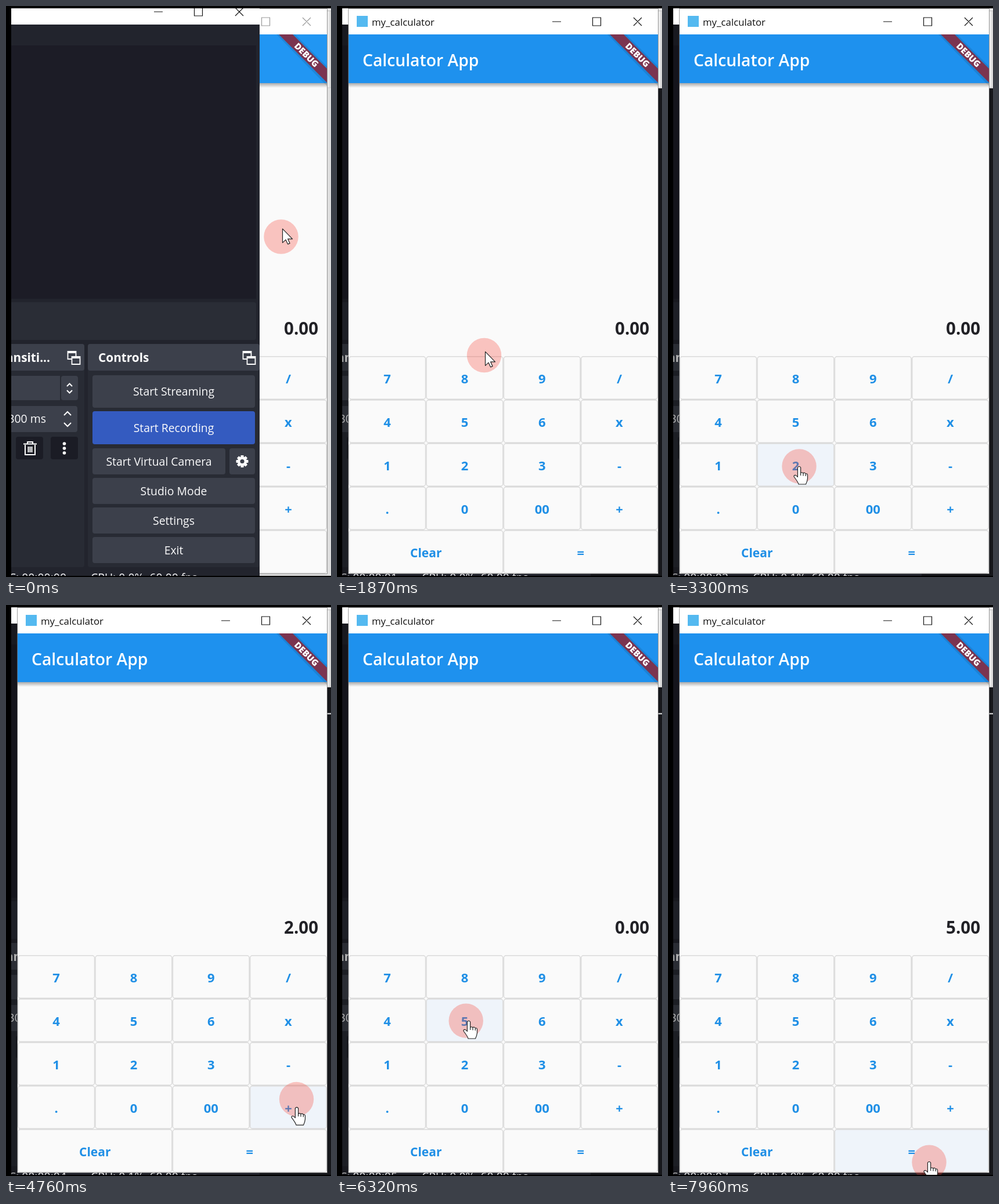
Recreate the animation shown at these times as an HTML page. Size 560x985 px, loop 8 s.

```html
<!DOCTYPE html>
<html lang="en">
<head>
<meta charset="utf-8">
<title>Calculator demo</title>
<style>
  html, body { margin: 0; width: 100%; height: 100%; overflow: hidden; background: #000; }
  svg { display: block; width: 560px; height: 985px; font-family: "Open Sans", "Noto Sans", sans-serif; }
  .ui { font-size: 19.4px; fill: #fbfbfc; }
  .dock { font-size: 20.8px; font-weight: 700; fill: #fff; }
  .key { font-size: 22px; font-weight: 700; fill: #1f8fe6; text-anchor: middle; }
  .mid { text-anchor: middle; }
  .end { text-anchor: end; }
  .line { fill: none; stroke: #fff; stroke-width: 2; }
</style>
</head>
<body>
<svg id="stage" viewBox="0 0 560 985">
  <defs>
    <clipPath id="screen"><rect x="9" y="4" width="551" height="979"/></clipPath>
    <clipPath id="panel"><rect x="9" y="4" width="428" height="979"/></clipPath>
    <clipPath id="app"><rect x="20" y="4" width="533" height="975"/></clipPath>
    <linearGradient id="shade" x2="0" y2="1">
      <stop offset="0" stop-opacity=".32"/><stop offset="1" stop-opacity="0"/>
    </linearGradient>
  </defs>
  <rect width="560" height="985"/>
  <g clip-path="url(#screen)">
    <rect id="desk" x="9" y="4" width="551" height="979"/>
    <path d="M553 4h7v138h-7z" fill="#e9e9e9"/>
    <path d="M553 8.5h7M553 141h7M558.5 9v132" stroke="#c4c4c4" fill="none"/>
    <path id="mark" d="M553 187.5h7" stroke="#e8e8e8" stroke-width="2"/>
    <g id="studio" clip-path="url(#panel)"></g>
    <path id="dim" d="M9 32h11v951H9z" fill-opacity=".3"/>
    <g id="calc" clip-path="url(#app)"></g>
    <path id="frame" d="M19.5 4.5h534v975h-534z" fill="none" stroke="#777" stroke-opacity=".7"/>
    <use id="front" href="#studio"/>
    <circle id="halo" r="29.7" fill="#f44336" fill-opacity=".3"/>
    <g id="pointer" fill="#fff" stroke="#222" stroke-width="1.2" stroke-linejoin="round">
      <path id="arrow" d="M.5.5V24.5L6 19.3 9.6 27 13 25.5 9.6 18H17.5Z"/>
      <path id="hand" d="M-2.6 2Q0-1.5 2.6 2V12Q4.6 9.5 7 12 9.5 10 11.3 13 14 12 14.5 15V21Q14 26 11.5 31H-1Q-2 27-8.6 18.5-10 15.5-6.6 15.3-4.6 16-2.6 18.5ZM2.6 12V16M7 12V16.5M11.3 13V17"/>
    </g>
  </g>
</svg>
<script>
const LOOP = 8000, RAISE = 210, SWAP = 900, MARK = 3650;
const $ = id => document.getElementById(id);
const rect = (x, y, x2, y2, fill, r = 0) =>
  `<rect x="${x}" y="${y}" width="${x2 - x}" height="${y2 - y}" rx="${r}" fill="${fill}"/>`;
const text = (x, y, str, cls, extra = '') => `<text x="${x}" y="${y}" class="${cls}" ${extra}>${str}</text>`;
const path = (d, cls, extra = '') => `<path d="${d}" class="${cls}" ${extra}/>`;
const winButtons = (x, y) =>
  `M${x} ${y}h15M${x + 69.5} ${y - 7}h14v14h-14zM${x + 140} ${y - 7}l14 14m0-14l-14 14`;

// Recording studio window
const GREY = '#3c404b', DARK = '#1b1c25';
const popIcon = x => `<g fill="${GREY}" stroke="#fff" stroke-width="1.8">
  <path d="M${x} 596h14v13h-14z"/><path d="M${x + 7} 605h14v13h-14z"/></g>` +
  path(`M${x} 598h14M${x + 7} 607h14`, 'line', 'stroke-width="3"');
const bar = (y, y2, label, x2 = 429, fill = GREY) =>
  rect(149, y, x2, y2, fill, 4) + text((149 + x2) / 2, (y + y2) / 2 + 7, label, 'ui mid');
const teeth = [0, 45, 90, 135].map(a =>
  `<rect x="-2.6" y="-10.5" width="5.2" height="21" rx="1" transform="rotate(${a})"/>`).join('');

$('studio').innerHTML = [
  rect(9, 4, 437, 983, '#22242d'),
  rect(9, 4, 437, 32, '#fff'),
  path(winButtons(255, 10), '', 'fill="none" stroke="#111" stroke-width="1.2"'),
  rect(9, 68, 431, 505, '#1c1c26'),
  rect(0, 511, 431, 576, '#2a2d36', 4),
  rect(0, 583, 135, 968, '#282b34', 4), rect(141, 583, 437, 968, '#282b34', 4),
  rect(0, 583, 135, 629, GREY, 4), rect(141, 583, 437, 629, GREY, 4),
  text(76, 614, 'Scene Transiti...', 'dock end'), popIcon(106.5),
  text(159, 614, 'Controls', 'dock'), popIcon(408.5),
  rect(0, 638, 93, 680, GREY), rect(95, 638, 124, 680, GREY, 4),
  path('M105 656l4.5-4.5 4.5 4.5M105 663l4.5 4.5 4.5-4.5', 'line'),
  rect(0, 690, 123, 735, GREY, 4), text(69, 719, '300 ms', 'ui end'),
  path('M100 706l6-6 6 6M100 719l6 6 6-6', 'line'),
  rect(17, 743, 64, 782, DARK, 4), rect(77, 743, 124, 782, DARK, 4),
  path('M30 755.5h23M37 755v-3h9v3M33 757v17h17v-17M38.5 760v10M41.5 760v10M44.5 760v10', 'line'),
  ...[755, 763, 771].map(y => `<circle cx="100.5" cy="${y}" r="2.8" fill="#fff"/>`),
  bar(637, 693, 'Start Streaming'),
  bar(699, 756, 'Start Recording', 429, '#345bc0'),
  bar(763, 808, 'Start Virtual Camera', 378),
  rect(385, 763, 429, 808, GREY, 4),
  `<g transform="translate(407 785.5)" fill="#fff">${teeth}<circle r="8"/><circle r="3.6" fill="${GREY}"/></g>`,
  bar(814, 859, 'Studio Mode'),
  bar(865, 910, 'Settings'),
  bar(916, 961, 'Exit'),
  text(104, 993, '', 'ui end', 'id="clock"'),
  text(146, 993, '', 'ui', 'id="load"')
].join('');

// Calculator window
const X = [20, 153.3, 286.6, 419.9, 553], TOP = 604, ROW = 75;
const keys = [];
['7 8 9 /', '4 5 6 x', '1 2 3 -', '. 0 00 +'].forEach((row, r) =>
  row.split(' ').forEach((label, c) => keys.push({ label, x: X[c], x2: X[c + 1], y: TOP + ROW * r })));
keys.push({ label: 'Clear', x: X[0], x2: X[2], y: TOP + ROW * 4 },
          { label: '=', x: X[2], x2: X[4], y: TOP + ROW * 4 });

$('calc').innerHTML = [
  rect(20, 4, 553, 979, '#fafafa'),
  rect(20, 133, 553, 141, 'url(#shade)'),
  rect(20, 4, 553, 49, '#fff'),
  rect(34, 17, 53, 36, '#54b9f0'),
  text(60, 34, 'my_calculator', '', 'font-size="16.8" fill="#111"'),
  path(winButtons(371, 27), '', 'id="buttons" fill="none" stroke-width="1.2"'),
  `<rect id="header" x="20" y="49" width="533" height="84"/>`,
  text(44, 104, 'Calculator App', '', 'font-size="28.3" font-weight="600" fill="#fff"'),
  path('M466 49h32l55 55v34z', '', 'fill-opacity=".1"'),
  path('M470 49h24l59 59v24z', '', 'fill="#7b3450"'),
  text(0, 5.5, 'DEBUG', 'mid', 'font-size="15" font-weight="800" fill="#fff" transform="translate(518 84.5) rotate(45)"'),
  text(538, 567, '0.00', 'end', 'id="total" font-size="29.5" font-weight="700" fill="#212126"'),
  ...keys.map(k =>
    `<rect x="${k.x + .75}" y="${k.y + .75}" width="${k.x2 - k.x - 1.5}" height="${ROW - 1.5}" rx="4" stroke="#dadada" stroke-width="1.5" class="cell"/>` +
    text((k.x + k.x2) / 2, k.y + 47, k.label, 'key', k.label === 'Clear' ? 'style="font-size:21px"' : ''))
].join('');
const cells = [...document.querySelectorAll('.cell')];

// Pointer route: time, x, y
const route = [
  [-40, 474, 398], [0, 476, 384], [300, 477, 354], [620, 462, 361], [830, 430, 402], [1180, 430, 402],
  [1500, 320, 545], [1720, 258, 612], [1870, 255, 596], [2100, 270, 563], [2300, 282, 585],
  [2650, 234, 770], [2800, 226, 794], [3920, 226, 794], [4450, 470, 790], [4680, 498, 837],
  [4760, 501, 866], [4850, 501, 868], [5560, 501, 868], [5900, 340, 780], [6180, 213, 724],
  [6320, 227, 717], [7000, 227, 717], [7300, 375, 555], [7450, 415, 585], [7700, 423, 741],
  [7830, 437, 868], [7915, 450, 958], [7960, 450, 960], [8000, 450, 960]
];
const totals = [[0, '0.00'], [3400, '2.00'], [4950, '0.00'], [6520, '5.00']];

function slope(i, k) {
  const a = route[i - 1], b = route[i], c = route[i + 1];
  if (!a || !c || a[k] === b[k] || b[k] === c[k]) return 0;
  return (c[k] - a[k]) / (c[0] - a[0]);
}

function locate(t) {
  let i = route.findIndex(p => p[0] > t) - 1;
  if (i < 0) i = route.length - 2;
  const a = route[i], b = route[i + 1], d = b[0] - a[0];
  const u = Math.min(1, (t - a[0]) / d), v = 1 - u;
  return [1, 2].map(k => v * v * (1 + 2 * u) * a[k] + u * u * (3 - 2 * u) * b[k] +
    u * v * d * (v * slope(i, k) - u * slope(i + 1, k)));
}

const show = (id, on) => $(id).setAttribute('display', on ? 'inline' : 'none');
const setText = (id, s) => { if ($(id).textContent !== s) $(id).textContent = s; };

function draw(t) {
  const raised = t >= RAISE, swapped = t >= SWAP;
  const [x, y] = locate(t), [hx, hy] = locate(t - 40);
  $('pointer').setAttribute('transform', `translate(${x} ${y})`);
  $('halo').setAttribute('transform', `translate(${hx} ${hy})`);
  const over = keys.findIndex(k => x >= k.x && x < k.x2 && y >= k.y && y < k.y + ROW);
  cells.forEach((c, i) => c.setAttribute('fill', i === over ? '#eff4fa' : '#fafafa'));
  show('hand', over >= 0);
  show('arrow', over < 0);
  show('front', !raised);
  show('dim', raised);
  show('mark', t >= MARK);
  $('desk').setAttribute('fill', swapped ? '#16171b' : '#dedede');
  $('header').setAttribute('fill', swapped ? '#1e91ee' : '#2196f3');
  $('buttons').setAttribute('stroke', raised ? '#111' : '#999');
  setText('total', totals.filter(s => s[0] <= t).pop()[1]);
  setText('clock', 'REC: 00:00:0' + Math.max(0, Math.floor((t - 350) / 1000)));
  setText('load', `CPU: 0.${t > 2800 && t < 5400 ? 1 : 0}%, 60.00 fps`);
}

const start = performance.now();
function tick() {
  draw((performance.now() - start) % LOOP);
  requestAnimationFrame(tick);
}
tick();
</script>
</body>
</html>
```
